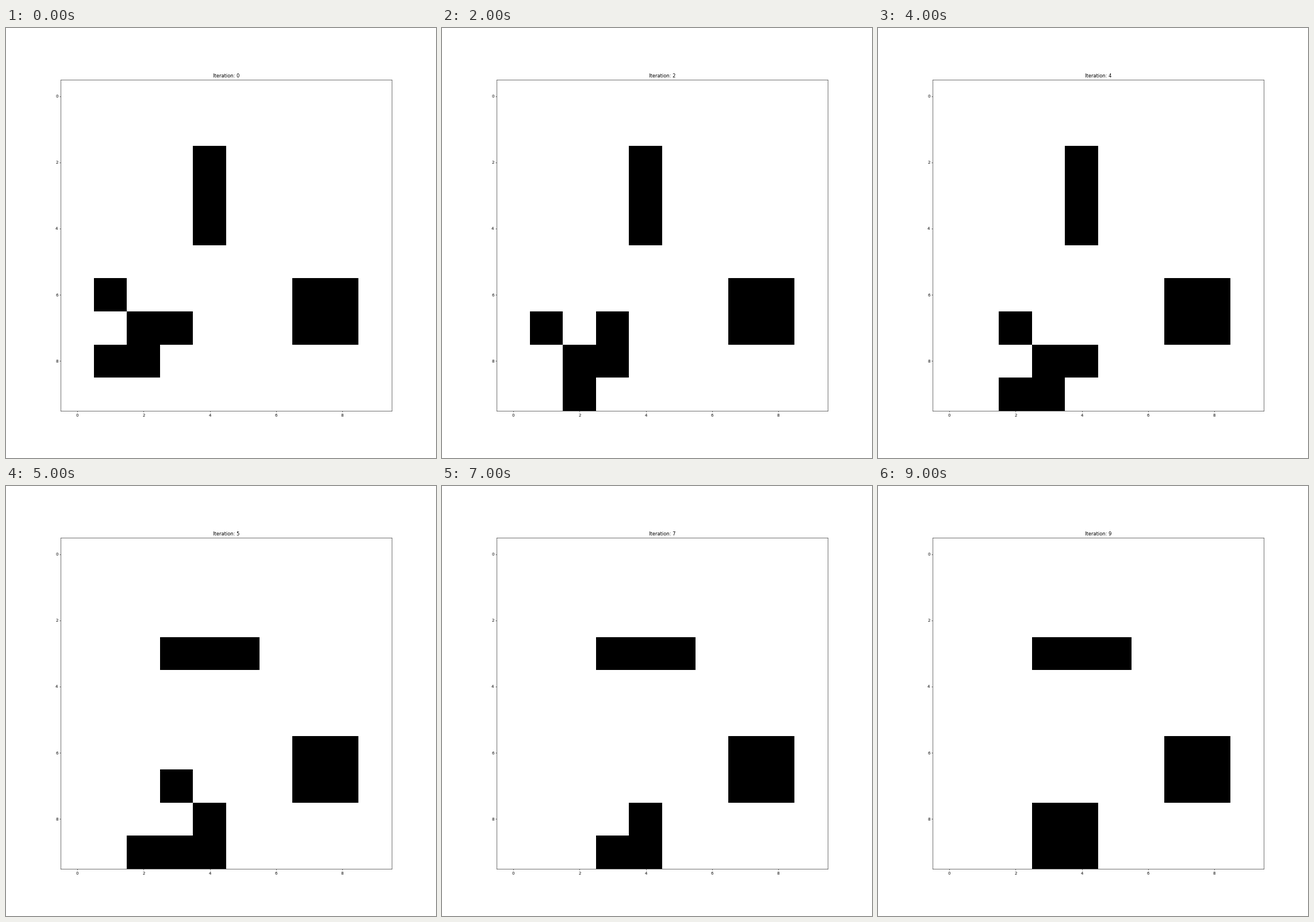
Recreate the animation shown at these times as a matplotlib script. Size 748 by 748 pixels, loop 10000 ms.

```python
import matplotlib.pyplot as plt
import numpy as np
from matplotlib.animation import FuncAnimation

SIDE, DPI = 748, 50
CELLS, STEPS, STEP_MS = 10, 10, 1000

plt.rcParams["font.family"] = "DejaVu Sans"


def seed_grid():
    grid = np.zeros((CELLS, CELLS), dtype=int)
    grid[2:5, 4] = 1                                        # blinker
    grid[6:8, 7:9] = 1                                      # block
    grid[6:9, 1:4] = [[1, 0, 0], [0, 1, 1], [1, 1, 0]]      # glider
    return grid


def evolve(grid):
    """One Game of Life step; everything beyond the border is dead."""
    pad = np.pad(grid, 1)
    around = sum(pad[r:r + CELLS, c:c + CELLS]
                 for r in range(3) for c in range(3)) - grid
    return ((around == 3) | ((grid == 1) & (around == 2))).astype(int)


history = [seed_grid()]
while len(history) < STEPS:
    history.append(evolve(history[-1]))

fig, ax = plt.subplots(figsize=(SIDE / DPI, SIDE / DPI), dpi=DPI)
board = ax.imshow(history[0], cmap="binary", vmin=0, vmax=1,
                  interpolation="nearest")
title = ax.set_title("Iteration: 0")


def update(step):
    board.set_data(history[step])
    title.set_text(f"Iteration: {step}")
    return board, title


anim = FuncAnimation(fig, update, frames=STEPS, interval=STEP_MS,
                     repeat=True, repeat_delay=0, blit=False)
plt.show()
```
